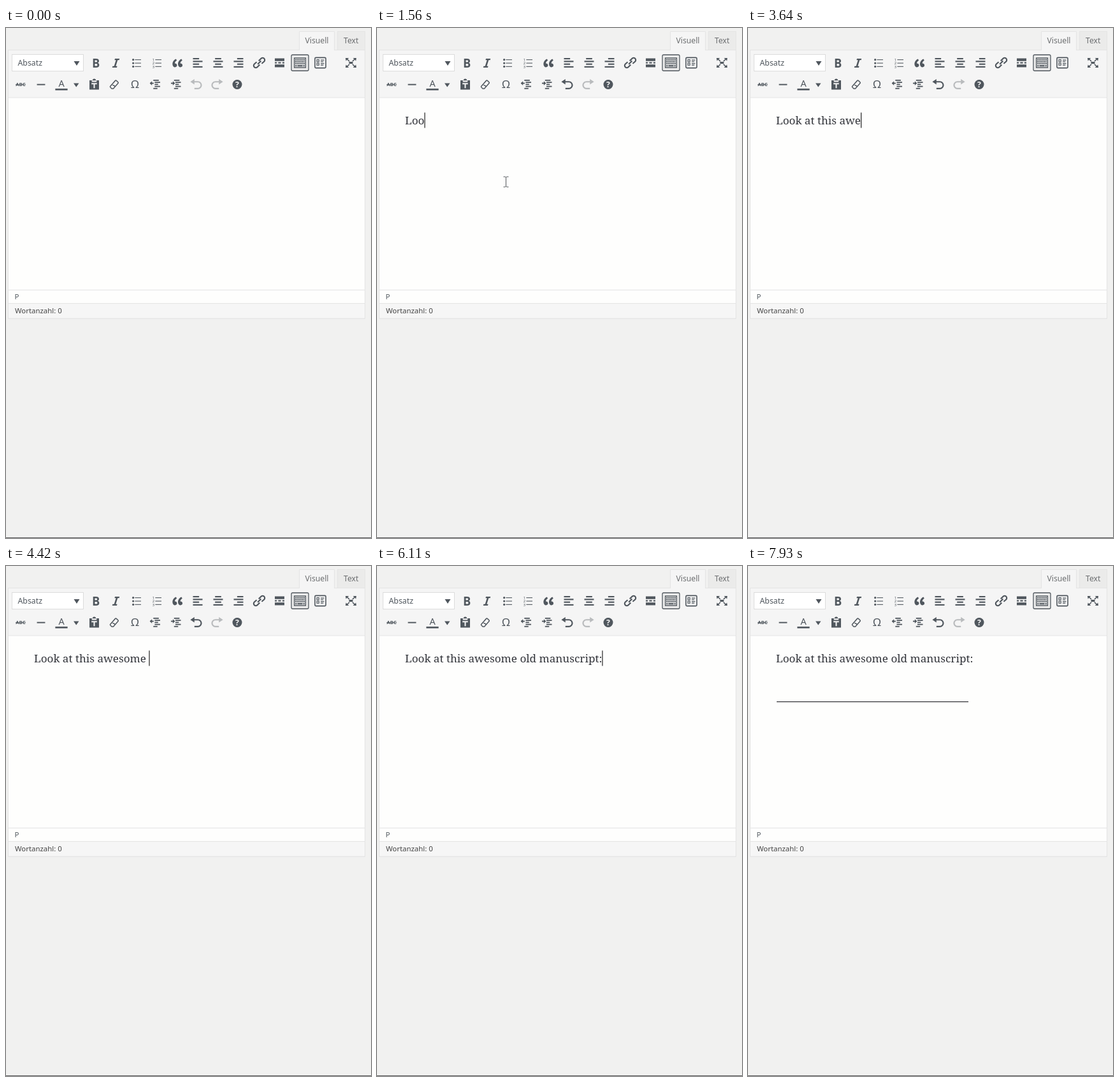
These frames come from a looping animation (573x799 px, 8000 ms). An HTML page:

```html
<!DOCTYPE html>
<html lang="de">
<head>
<meta charset="utf-8">
<title>Editor</title>
<style>
html, body { margin: 0; width: 573px; height: 799px; overflow: hidden; background: #f1f1f0; }
svg { display: block; }
text { white-space: pre; }
.ui { font-family: "Noto Sans", sans-serif; }
.doc { font-family: "Noto Serif", serif; font-size: 17.12px; fill: #32343a; }
.icon { fill: #50575e; stroke: none; }
.icon .l { fill: none; stroke: #50575e; }
</style>
</head>
<body>
<svg id="stage" width="573" height="799" viewBox="0 0 573 799">
  <rect width="573" height="799" fill="#f1f1f0"/>
  <rect y="798" width="573" height="1" fill="#5e5e5e"/>

  <g stroke="#e4e4e4">
    <rect x="520.5" y="5.5" width="43" height="29" fill="#ebebea"/>
    <rect x="3.5" y="34.5" width="560" height="420.5" fill="#fefefd"/>
    <rect x="3.5" y="34.5" width="560" height="74.5" fill="#f5f5f5"/>
    <rect x="3.5" y="431.5" width="560" height="23.5" fill="#f6f6f6"/>
    <path d="M3.5 410.5h560"/>
    <path d="M460.5 35V5.5h55V35" fill="#f5f5f5"/>
  </g>
  <g class="ui" fill="#6c6e70" font-size="12.2">
    <text x="469.5" y="23.5">Visuell</text>
    <text x="530" y="23.5">Text</text>
  </g>
  <rect x="9.5" y="41.5" width="112" height="26" fill="#fff" stroke="#dcdcdc"/>
  <g class="ui" fill="#50575e">
    <text x="18.5" y="59" font-size="12.3">Absatz</text>
    <text id="path" x="13.5" y="425" font-size="11.4">P</text>
    <text x="14" y="447" font-size="11.4" fill="#444">Wortanzahl: 0</text>
  </g>
  <path d="M106.5 52h9l-4.5 7zM106 86.500h8.500l-4.250 6z" fill="#50575e"/>
  <rect x="448" y="42" width="27" height="25" rx="2" fill="#ebebeb" stroke="#50575e" stroke-width="1.3"/>
  <g id="icons"></g>

  <text id="line1" class="doc" x="44" y="150.5"></text>
  <g id="link">
    <text id="url" class="doc" x="44" y="206.500"></text>
    <path id="waves" fill="none" stroke="#cf5a68" stroke-width="1"/>
  </g>
  <rect id="embed" x="45" y="212" width="301" height="1.3" fill="#3c3c40"/>
  <rect id="caret" width="1.2" height="24" fill="#222"/>
  <path id="beam" d="M-4 -8h3l1 1l1 -1h3M0 -7v14M-4 8h3l1 -1l1 1h3" fill="none" stroke="#55585c"/>
</svg>
<script>
const $ = id => document.getElementById(id);
const rect = (x, y, w, h, extra = '') => `<rect x="${x}" y="${y}" width="${w}" height="${h}" ${extra}/>`;
const path = (d, extra = '') => `<path d="${d}" ${extra}/>`;
const line = (d, w) => path(d, `class="l" stroke-width="${w}"`);
const label = (s, x, y, size, weight = 400, extra = '') =>
  `<text class="ui" x="${x}" y="${y}" font-size="${size}" font-weight="${weight}" text-anchor="middle" ${extra}>${s}</text>`;
const repeat = (n, f) => Array.from({ length: n }, (_, i) => f(i)).join('');

const align = x => repeat(4, i => i % 2 ? rect(3, 3 + 4 * i, 14, 2) : rect(x, 3 + 4 * i, 9, 2));
const list = mark => repeat(3, i => mark(i) + rect(8, 5 + 5 * i, 9, 1));
const bullet = i => `<circle cx="5.500" cy="${5.5 + 5 * i}" r="1.500"/>`;
const digit = i => label(i + 1, 5.2, 7.6 + 5 * i, 5.4);
const comma = 'M9.490 13.220c0-.740-.200-1.380-.610-1.900-.620-.780-1.830-.880-2.530-.720-.290-1.650 1.110-3.750 2.920-4.650L7.880 4c-2.730 1.300-5.420 4.280-4.960 8.050C3.210 14.430 4.590 16 6.540 16c.850 0 1.560-.250 2.120-.750s.830-1.180.830-2.030z';
const bold = 'M6 4v13h4.540c1.370 0 2.460-.330 3.260-1 .800-.660 1.200-1.580 1.200-2.770 0-1.600-.700-2.700-2.180-3.040v-.090c1.200-.250 1.870-1.300 1.870-2.810C14.690 4.900 13 4 9.780 4zM8.570 9.150V6.260h1.360c1.400 0 2.120.400 2.120 1.390 0 1.100-.700 1.500-1.980 1.500zM8.570 11.340h1.600c1.440 0 2.160.530 2.160 1.610 0 1.200-.700 1.770-2.080 1.770H8.570z';
const half = 'M9.300 7.300L12.800 3.800a3.100 3.100 0 0 1 4.400 4.400L13.700 11.200';
const back = 'M12 5H7V2L1 6l6 4V7h5c2.200 0 4 1.800 4 4s-1.800 4-4 4H7v2h5c3.300 0 6-2.700 6-6s-2.700-6-6-6z';
const shift = d => rect(7, 3, 8, 1.7) + rect(9, 6, 8, 1.7) + rect(9, 9, 5, 1.7) + rect(9, 12, 8, 1.7) +
  rect(7, 15, 6, 1.700) + rect(2.5, 7.3, 5, 1.800) + path(d);
const arrow = 'M2 3h5L5.300 4.700L8.200 7.300L7.200 8.300L4.400 5.600L2.700 7.200z';
const keys = rect(1.7, 3, 16.6, 14, 'class="l" stroke-width="1.3"') +
  repeat(3, r => repeat(6, c => rect(3.2 + c * 2.4 - (r % 2) * .3, 4.6 + r * 2.8, 1.7, 1.9))) +
  rect(3.2, 13.4, 2, 2) + rect(6.2, 13.4, 7.600, 2) + rect(14.8, 13.4, 2, 2);
const form = rect(2, 2.4, 16, 15.200, 'rx="1.500" class="l" stroke-width="1.500"') +
  repeat(2, i => rect(4.9, 5.5 + 5 * i, 3, 3, 'class="l" stroke-width="1.100"') +
    rect(10.5, 5.5 + 5 * i, 5, 1.200) + rect(10.5, 7.8 + 5 * i, 4, 1.2));

// x centre, y centre, body
const icons = [
  [141, 54.5, path(bold)],
  [172.5, 54.5, path('M14.780 6h-2.130l-2.800 9h2.120l-.620 2H4.600l.620-2h2.140l2.800-9H8.030l.620-2h6.750z')],
  [204.5, 54.5, list(bullet)],
  [236.5, 54.5, list(digit)],
  [269, 55, path(comma) + path(comma, 'transform="translate(8.050 0)"')],
  [301, 54.5, align(3)],
  [333, 54.5, align(5.5)],
  [365, 54.5, align(8)],
  [397.5, 54.5, line(half, 2) + `<g transform="rotate(180 10 10)">${line(half, 2)}</g>` + line('M7.800 12.200L12.700 7.300', 2)],
  [429.5, 54.5, rect(3, 3.5, 14, 4) + rect(3, 9, 3, 2) + rect(8, 9, 4, 2) + rect(14, 9, 3, 2) + rect(3, 12.5, 14, 4)],
  [461.5, 54.5, keys],
  [493.5, 54.5, form],
  [541.5, 54.5, repeat(4, i => path(arrow, `transform="translate(10 10) scale(${i % 2 ? -1 : 1} ${i > 1 ? -1 : 1}) translate(-10 -10)"`)) + rect(7.2, 8.500, 5.600, 3)],
  [23, 88.5, label('ABC', 10, 12.800, 7.2, 600) + rect(2.500, 9.7, 15, .9)],
  [55, 88.5, rect(4, 9.2, 12, 1.8)],
  [87, 88.5, label('A', 10, 13.5, 13.5) + rect(1, 16, 18, 2.5)],
  [138.5, 88.5, path('M3 4h4.500a2.500 2.500 0 0 1 5 0H17v13.500H3z') + path('M6.500 5.200h7M6 8.800h8M10 8.800v6.500', 'fill="none" stroke="#f5f5f5" stroke-width="1.900"')],
  [170, 88.5, line('M4.200 12.500L11.500 4.300Q12.200 3.700 13 4.300L15.600 6.700Q16.200 7.400 15.600 8.100L8.600 16H6.300L4.200 14Q3.500 13.300 4.200 12.500zM6.700 9.800L11.500 13', 1.4)],
  [202.5, 88.5, label('Ω', 10, 15.5, 16, 500)],
  [234.5, 88.5, shift('M5 5v6.400L1.800 8.200z')],
  [267, 88.5, shift('M5.200 5v6.400L8.400 8.200z')],
  [299, 88.5, path(back, 'id="undo"')],
  [331, 88.5, path(back, 'fill="#b9bbbd" transform="matrix(-1 0 0 1 20 0)"')],
  [363, 88.5, '<circle cx="10" cy="10" r="7"/>' + label('?', 10, 14.200, 11.5, 800, 'fill="#f5f5f5"')]
];
$('icons').innerHTML = icons.map(([x, y, body]) =>
  `<g class="icon" transform="translate(${x} ${y}) scale(1.07) translate(-10 -10)">${body}</g>`).join('');

const phrase = 'Look at this awesome old manuscript:';
const address = 'https://viewer-demo01.intranda.com/viewer/image/1051/2/';
// time, characters typed
const typing = [
  [1170, 1], [1430, 2], [1560, 3], [1690, 4], [1950, 5], [2210, 7], [2340, 8], [2470, 9], [2600, 10],
  [2730, 11], [2860, 12], [2990, 13], [3250, 14], [3380, 15], [3640, 16], [3900, 17], [4030, 18],
  [4160, 19], [4290, 20], [4420, 21], [4550, 22], [4680, 24], [4810, 25], [4940, 26], [5070, 27],
  [5200, 29], [5330, 31], [5590, 33], [5850, 35], [6110, 36]
];
const pointer = [[130, 215, 312], [260, 206, 265], [390, 202.5, 239.5], [650, 202.5, 241]];
const last = (steps, t) => steps.filter(s => s[0] <= t).pop();
const show = (id, on) => $(id).setAttribute('visibility', on ? 'visible' : 'hidden');

function wave(word) {
  const i = address.indexOf(word), from = 44 + $('url').getSubStringLength(0, i);
  const n = Math.round($('url').getSubStringLength(i, word.length) / 2);
  return `M${from} 210.500` + repeat(n, k => `l2 ${k % 2 ? 2 : -2}`);
}
$('url').textContent = address;
$('waves').setAttribute('d', wave('https') + wave('demo01.intranda.com'));

function caretAt(t) {
  if (t < 6370) return [44 + (t < 1170 ? 0 : $('line1').getComputedTextLength()), 132.5];
  if (t < 6630) return [44, 188.500];
  if (t < 6890) return [44 + $('url').getComputedTextLength(), 188.500];
  return [44.500, 244.500];
}

function draw(t) {
  const typed = last(typing, t);
  $('line1').textContent = phrase.slice(0, typed ? typed[1] : 0);
  $('undo').setAttribute('fill', typed ? '#50575e' : '#b9bbbd');
  show('link', t >= 6630 && t < 7930);
  show('embed', t >= 7930);
  show('path', t < 6890 || t >= 7930);

  const [x, y] = caretAt(t);
  $('caret').setAttribute('x', x);
  $('caret').setAttribute('y', y);
  show('caret', t >= 390 && t < 7540);

  const p = last(pointer, t);
  show('beam', p && t < 2210);
  if (p) $('beam').setAttribute('transform', `translate(${p[1]} ${p[2]})`);
}

function tick() {
  draw(performance.now() % 8000);
  requestAnimationFrame(tick);
}
tick();
</script>
</body>
</html>
```
